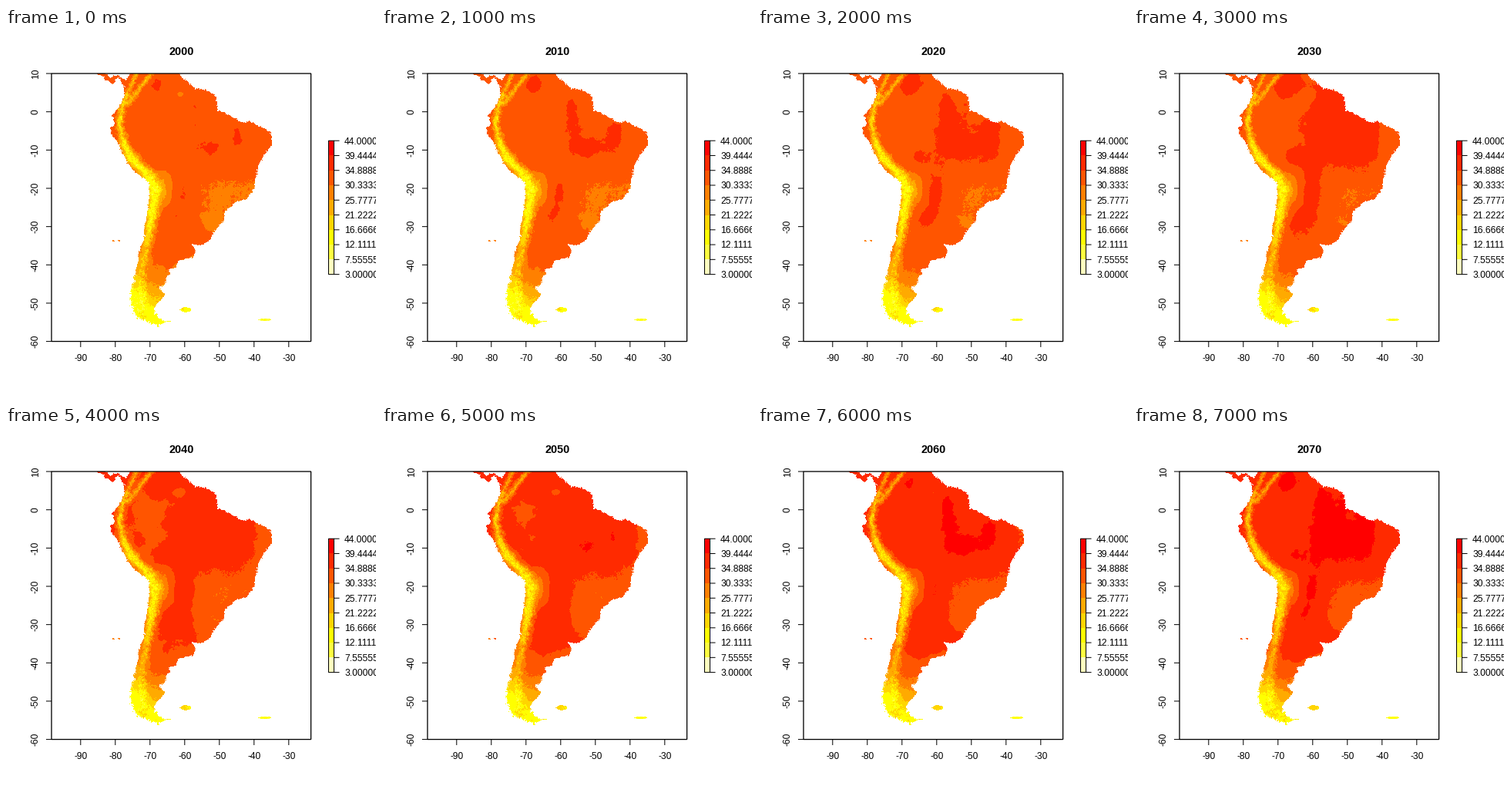
These frames come from a looping animation (480x480 px, 8 s). A matplotlib script:

```python
import numpy as np
import matplotlib.pyplot as plt
from matplotlib.animation import FuncAnimation
from matplotlib.path import Path
from matplotlib.patches import Rectangle

SIZE, DPI = 480, 72
LEFT, RIGHT, TOP, BOTTOM = 59, 396, 59, 407
STEP_MS = 1000
YEARS = range(2000, 2080, 10)
LEVELS = np.linspace(3, 44, 10)
COLORS = np.array(
    [(255, 255, 191), (255, 255, 64)] + [(255, g, 0) for g in (255, 213, 170, 128, 85, 42, 0)],
    dtype=np.uint8)

# Key points of the coast as longitude, latitude
PACIFIC = [
    (-85.6, 10.2), (-83.6, 9.0), (-82.9, 8.2), (-82.0, 8.2), (-80.9, 7.2), (-80.1, 7.5),
    (-80.3, 8.3), (-79.2, 8.9), (-78.1, 7.8), (-77.4, 6.5), (-77.2, 4.0), (-78.9, 1.5),
    (-80.9, -1.1), (-80.0, -2.9), (-81.3, -4.5), (-81.0, -6.0), (-79.5, -7.5),
    (-77.3, -11.8), (-76.3, -13.8), (-74.6, -15.7), (-71.4, -17.6), (-70.4, -18.5),
    (-70.1, -21.0), (-70.6, -26.0), (-71.6, -30.0), (-71.6, -33.5), (-73.5, -37.3),
    (-73.3, -39.3), (-74.1, -43.0), (-75.4, -46.0), (-75.4, -50.0), (-73.8, -53.2),
    (-71.0, -54.8), (-67.8, -55.8)]
ATLANTIC = [
    (-65.2, -54.8), (-67.0, -54.2), (-68.5, -52.6), (-69.0, -51.0), (-67.7, -50.0),
    (-65.8, -48.0), (-67.5, -46.0), (-65.4, -44.8), (-65.1, -43.3), (-63.8, -42.5),
    (-65.0, -41.2), (-62.3, -40.6), (-62.1, -39.0), (-57.7, -38.2), (-56.7, -36.5),
    (-58.4, -34.3), (-55.0, -34.9), (-53.2, -33.7), (-50.2, -30.0), (-48.6, -28.3),
    (-48.5, -26.0), (-45.0, -23.5), (-42.0, -22.8), (-39.8, -19.8), (-38.9, -14.5),
    (-37.3, -11.5), (-35.0, -8.7), (-34.8, -7.0), (-35.3, -5.3), (-38.5, -3.7),
    (-40.0, -2.8), (-44.2, -2.5), (-47.5, -0.7), (-50.2, 0.2), (-51.2, 4.1), (-54.0, 5.8),
    (-57.0, 6.0), (-62.0, 10.2), (-75.6, 10.2), (-76.8, 8.2), (-79.4, 9.5), (-81.3, 8.9),
    (-83.2, 10.2)]
# Islands in pixels: x, y, radii
ISLANDS = [(233, 365.5, 8, 3.2), (336, 378.5, 7, 1.6), (211, 380.5, 4, 0.9),
           (139.5, 276, 2, 0.9), (147, 275.8, 1.3, 1)]

# Mountain crests from north to south: x, y, half width, cooling
ANDES = [(169, 60, 3, 10), (150, 103, 4, 15), (147, 125, 4, 15), (152, 149, 5, 16),
         (165, 172, 9, 17), (184, 187, 10, 17), (194, 212, 9, 16), (190, 243, 7, 16),
         (185, 280, 5, 13), (178, 322, 5, 4)]
EAST_CREST = [(188, 60, 4, 12), (160, 96, 4, 12), (157, 104, 3, 0)]

# Warm and cool regions: x, y, radii, degrees
REGIONS = [
    (195, 76, 15, 18, 3.0), (246, 103, 11, 22, 2.1), (266, 158, 30, 18, 2.6),
    (306, 140, 14, 24, 2.3), (208, 168, 12, 12, 2.1), (231, 212, 13, 26, 2.7),
    (217, 242, 14, 14, 2.5), (270, 135, 50, 40, 0.9), (186, 120, 28, 28, -1.4),
    (292, 214, 38, 24, -3.2), (268, 250, 22, 22, -3.5), (206, 208, 11, 24, -6),
    (226, 86, 7, 5, -2.6)]

rng = np.random.default_rng(11)
X, Y = np.meshgrid(np.arange(LEFT, RIGHT) + 0.5, np.arange(TOP, BOTTOM) + 0.5)


def lon_px(lon):
    return 96.8 + (lon + 90) * 4.5


def lat_px(lat):
    return 59.04 + (10 - lat) * 4.965


def noise(power):
    """Unit-variance fractal noise over the map."""
    fy, fx = np.fft.fftfreq(X.shape[0]), np.fft.fftfreq(X.shape[1])
    k = np.maximum(np.hypot(fx[None, :], fy[:, None]), 0.012)
    field = np.fft.ifft2(np.fft.fft2(rng.normal(size=X.shape)) / k ** power).real
    return (field - field.mean()) / field.std()


def bump(x, y, rx, ry):
    return np.exp(-((X - x) / rx) ** 2 - ((Y - y) / ry) ** 2)


def ramp(v, a, b):
    return np.clip((v - a) / (b - a), 0, 1)


def land_mask():
    rough = 0.7 + 0.8 * ramp(Y, 310, 340) * ramp(X, 200, 170)
    px, py = X + rough * noise(0.8), Y + rough * noise(0.8)
    coast = Path([(lon_px(a), lat_px(b)) for a, b in PACIFIC + ATLANTIC])
    mask = coast.contains_points(np.column_stack([px.ravel(), py.ravel()])).reshape(X.shape)
    for x, y, rx, ry in ISLANDS:
        mask |= ((px - x) / rx) ** 2 + ((Y - y) / ry) ** 2 < 1
    return mask


def crest(points):
    """Signed distance east of a crest, its profile and its cooling."""
    cx, cy, width, depth = np.array(points, float).T
    d = X - np.interp(Y, cy, cx) + 1.2 * noise(0.9)
    shape = np.exp(-(d / np.interp(Y, cy, width)) ** 2)
    return d, shape, shape * np.interp(Y, cy, depth)


def climate():
    """Temperature in the first year and the local rate of warming."""
    south = Y + 0.4 * np.abs(X - 208)
    temp = 32.4 - 0.0113 * np.maximum(south - 290, 0) ** 1.65
    temp -= 1.5 * ramp(X, 300, 345)
    for x, y, rx, ry, amount in REGIONS:
        temp += amount * bump(x, y, rx, ry)

    east, high, cool = crest(ANDES)
    _, high2, cool2 = crest(EAST_CREST)
    temp -= cool + cool2 + 5 * ramp(-east, 0, 4) * ramp(Y, 130, 200)
    temp = np.maximum(temp, 12.8)
    high = np.maximum(high, high2 * (Y < 100))
    cold = ramp(Y, 305, 335)
    temp += 0.35 * noise(1.5) + (2 * high + 0.8 * cold) * noise(0.8)
    temp += 0.8 * bump(290, 215, 40, 40) * noise(0.9)

    inland = ramp(X, 185, 240)
    rate = 0.8 + 0.22 * inland - 0.35 * ramp(X, 295, 340)
    rate -= 0.2 * ramp(Y, 180, 230) * inland + 0.4 * ramp(Y, 270, 350)
    rate -= 0.3 * bump(285, 235, 40, 40)
    return temp, np.maximum(rate * (1 - 0.45 * high), 0.2)


def picture(i):
    warming = 6.3 * (i / (len(YEARS) - 1)) ** 1.15
    rgb = COLORS[np.digitize(TEMP + RATE * warming, LEVELS[1:-1])]
    rgb[~LAND] = 255
    return rgb


LAND = land_mask()
TEMP, RATE = climate()
PICTURES = [picture(i) for i in range(len(YEARS))]

plt.rcParams["font.family"] = "Liberation Sans"
fig = plt.figure(figsize=(SIZE / DPI, SIZE / DPI), dpi=DPI, facecolor="white")
ax = fig.add_axes([0, 0, 1, 1])
image = ax.imshow(PICTURES[0], extent=(LEFT, RIGHT, BOTTOM, TOP),
                  interpolation="nearest", aspect="auto")
ax.set_xlim(0, SIZE)
ax.set_ylim(SIZE, 0)
ax.axis("off")


def line(x0, y0, x1, y1):
    ax.plot([x0, x1], [y0, y1], color="black", lw=1, snap=False, solid_capstyle="butt")


def box(x0, y0, x1, y1, lw=1):
    ax.add_patch(Rectangle((x0, y0), x1 - x0, y1 - y0, fill=False, ec="black",
                           lw=lw, snap=False, zorder=3))


def label(x, y, s, size=12, **kw):
    return ax.text(x, y, s, fontsize=size, va="baseline", **kw)


box(59.04, 59.04, 395.6, 406.56, lw=1.3)
for lon in range(-90, -20, 10):
    x = lon_px(lon)
    line(x, 406.5, x, 414)
    label(x, 432, str(lon), ha="center")
for lat in range(10, -70, -10):
    y = lat_px(lat)
    line(52, y, 59, y)
    label(42, y, str(lat), ha="center", rotation=90, rotation_mode="anchor")

# Colour key
BAR_X, BAR_W, BAR_TOP, BAR_END = 418.5, 7, 146.2, 319.6
cell = (BAR_END - BAR_TOP) / len(COLORS)
for i, color in enumerate(COLORS):
    ax.add_patch(Rectangle((BAR_X, BAR_END - (i + 1) * cell), BAR_W, cell,
                           fc=color / 255, ec="none", snap=True))
box(BAR_X, BAR_TOP, BAR_X + BAR_W, BAR_END)
for i, value in enumerate(LEVELS):
    y = BAR_END - i * cell
    line(BAR_X + BAR_W, y, BAR_X + BAR_W + 7, y)
    label(439, y + 4.4, f"{value:#.7g}", ha="left")

title = label(227.9, 35, str(YEARS[0]), size=14.4, ha="center", weight="bold")


def update(i):
    image.set_data(PICTURES[i])
    title.set_text(str(YEARS[i]))
    return image, title


anim = FuncAnimation(fig, update, frames=len(YEARS), interval=STEP_MS, repeat=True,
                     repeat_delay=0, blit=False)
plt.show()
```
